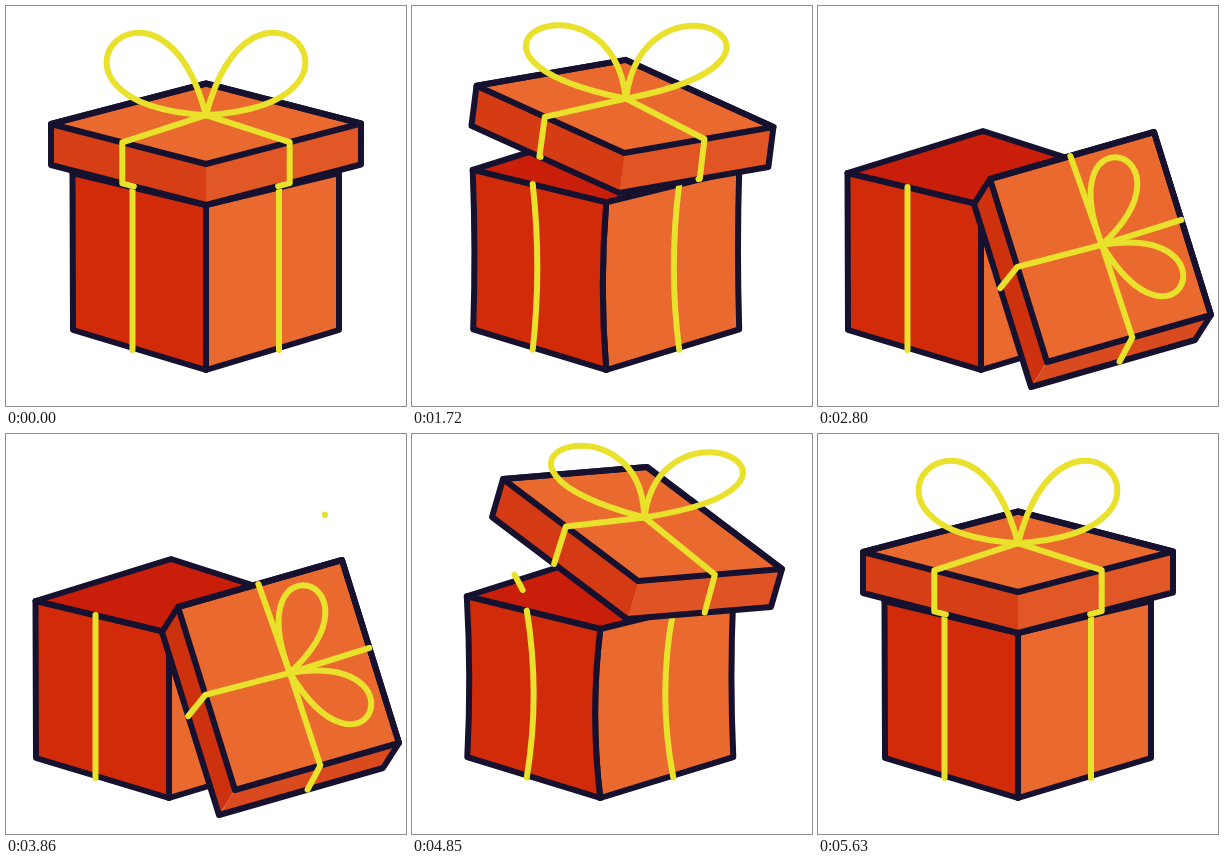
These frames come from a looping animation (400 px wide and 400 px high, 5660 ms). An HTML page with a canvas:

```html
<!DOCTYPE html>
<html lang="en">
<head>
<meta charset="utf-8">
<title>Gift box</title>
<style>
  html, body { margin: 0; width: 100%; height: 100%; overflow: hidden; background: #fff; }
  canvas { display: block; width: 100vw; height: 100vh; }
</style>
</head>
<body>
<canvas id="stage" width="400" height="400"></canvas>
<script>
const ctx = document.getElementById('stage').getContext('2d');
const INK = '#15112f', RIBBON = '#e9e12c', ORANGE = '#e9692f', RED = '#d22b0a', INSIDE = '#c81e0a';
const STEP = 30, LAST = 60, LOOP = 5660, FLOOR = 364;

const clamp = u => Math.min(1, Math.max(0, u));
const linear = (f, from, to) => clamp((f - from) / (to - from));
const ramp = (f, from, to) => {
  const u = linear(f, from, to);
  return u * u * (3 - 2 * u);
};
const lerp = (a, b, u) => [a[0] + (b[0] - a[0]) * u, a[1] + (b[1] - a[1]) * u];
const add = (a, b, k = 1) => [a[0] + b[0] * k, a[1] + b[1] * k];
const polar = (length, degrees) => {
  const a = degrees * Math.PI / 180;
  return [length * Math.cos(a), length * Math.sin(a)];
};

// The lid is a slab: left corner, two edges from it, and its thickness.
// The bow has an aim in degrees and a loop length.
const closed = { corner: [45, 118], toBack: [155, -40.5], toFront: [155, 40], depth: [0, 41], bow: [-90, 311] };
const flying = { corner: [91, 45], toBack: [144, -12], toFront: [135, 102], depth: [-11, 38], bow: [-87, 281] };
const landed = { corner: [172, 166], toBack: [164, -47], toFront: [57, 183], depth: [-16, 25], bow: [-47, 252] };
const flight = f => ramp(f, 21, 35);
const MIDAIR = flight(26);

// Quadratic curve through the three poses.
function lidPart(name, s) {
  return closed[name].map((a, i) => {
    const b = flying[name][i], c = landed[name][i];
    const rise = (b - a) / MIDAIR, fall = (c - b) / (1 - MIDAIR);
    return a + rise * s + (fall - rise) * s * (s - MIDAIR);
  });
}

function bezier(points, u) {
  while (points.length > 1) points = points.slice(1).map((p, i) => lerp(points[i], p, u));
  return points[0];
}

function paint(fill, stroke) {
  if (fill) { ctx.fillStyle = fill; ctx.fill(); }
  if (stroke) { ctx.strokeStyle = stroke; ctx.stroke(); }
}

function poly(points, fill, stroke, close = true) {
  ctx.beginPath();
  points.forEach(p => ctx.lineTo(...p));
  if (close) ctx.closePath();
  paint(fill, stroke);
}
const ribbon = points => poly(points, null, RIBBON, false);

function trimmed(curveAt, tail, head) {
  if (head <= tail) return;
  const points = [];
  for (let i = 0; i <= 40; i++) points.push(curveAt(tail + (head - tail) * i / 40));
  ribbon(points);
}

const streakAt = u => bezier([[120, 176], [85, 95], [10, 29]], u);
const arcAt = u => u < 1
  ? bezier([[148, 184], [138, 110], [165, 42], [207, 23]], u)
  : bezier([[207, 23], [245, -2], [295, 5], [319, 81]], u - 1);

function drawSun(size) {
  if (size < .02) return;
  ctx.save();
  ctx.translate(102, 54);
  ctx.scale(size, size);
  ctx.beginPath();
  ctx.arc(0, 0, 16, 0, 7);
  paint(null, RIBBON);
  for (let i = 0; i < 4; i++) {
    ribbon([[16, 0], [18.5, 0]]);
    ctx.rotate(Math.PI / 2);
  }
  ctx.restore();
}

function drawConfetti(f) {
  trimmed(streakAt, linear(f, 24, 40), linear(f, 24, 33));
  trimmed(arcAt, 2 * ramp(f, 33, 59.5), 2 * ramp(f, 27, 43));
  drawSun(ramp(f, 28, 34) - ramp(f, 39, 47));
}

// 1 is fully pressed down, below 0 is stretched.
const squashAt = f => ramp(f, 0, 11) - 1.6 * ramp(f, 14, 27) + .6 * ramp(f, 27, 35);
const squeezeY = (y, squash) => FLOOR - (FLOOR - y) * (1 - .042 * squash);

function drawBox(f, squash) {
  const slide = -37 * ramp(f, 20, 36);
  const at = (x, y) => [x + slide, squeezeY(y, squash)];
  const bend = (from, to, bulge) => {
    const mid = lerp(from, to, .5);
    ctx.quadraticCurveTo(mid[0] + 2 * bulge, mid[1], ...to);
  };
  const [left, front, right] = [at(66.5, 167), at(200, 199), at(333, 167)];
  const [lowLeft, lowFront, lowRight] = [at(67, 324), at(200, 364), at(333, 324)];
  const sideBulge = squash > 0 ? squash : squash * .2;

  poly([left, at(202, 125), right, front], INSIDE, INK);
  drawConfetti(f);

  const face = (top, low, bulge, fill) => {
    ctx.beginPath();
    ctx.moveTo(...top);
    bend(top, low, bulge * sideBulge);
    ctx.lineTo(...lowFront);
    bend(lowFront, front, 9 * squash);
    ctx.closePath();
    paint(fill, INK);
  };
  face(right, lowRight, 16, ORANGE);
  face(left, lowLeft, -19, RED);

  for (const [x, bulge] of [[126.5, -12], [273, 14]]) {
    const top = at(x, 181);
    ctx.beginPath();
    ctx.moveTo(...top);
    bend(top, at(x, 344), bulge * squash);
    paint(null, RIBBON);
  }
}

function drawBow(knot, aim, length, width, skew, press) {
  for (const side of [-1, 1]) {
    const axis = aim + 52 * side;
    const half = polar(length / 2, axis), spread = polar(width / 2, axis - side * skew);
    const handle = k => {
      const [x, y] = add(half, spread, k);
      return add(knot, [x * (1 + .04 * press), y * (1 - .13 * press)]);
    };
    ctx.beginPath();
    ctx.moveTo(...knot);
    ctx.bezierCurveTo(...handle(1), ...handle(-1), ...knot);
    paint(null, RIBBON);
  }
}

function drawLid(f, squash) {
  const s = flight(f), settle = ramp(f, 34, 58), press = Math.max(squash, 0);
  const [corner, toBack, toFront, depth, bow] =
    ['corner', 'toBack', 'toFront', 'depth', 'bow'].map(name => lidPart(name, s));
  const pressed = ([x, y]) => [x, squeezeY(y, press)];

  const topLeft = add(corner, [0, 7 * settle]);
  const top = [topLeft, add(topLeft, toBack), add(add(topLeft, toBack), toFront), add(topLeft, toFront)];
  const [L, B, R, F] = top.map(pressed);
  const [lowL, , lowR, lowF] = top.map(p => pressed(add(p, depth)));
  const knot = pressed(add(lerp(top[0], top[2], .5), depth, -.21 * (1 - .6 * s)));

  const shade = (r, g, b) => `rgb(${r - 8 * s},${g - 13 * s},${b - 7 * s})`;
  poly([L, F, lowF, lowL], shade(214, 62, 21));
  poly([F, R, lowR, lowF], shade(226, 87, 38));
  poly([L, B, R, F], ORANGE, INK);
  poly([L, B, R, lowR, lowF, lowL], null, INK);

  const hook = 1 - ramp(f, 20, 25), back = ramp(f, 27, 35);
  for (const [edge, low, side] of [[L, lowL, 1], [R, lowR, -1]]) {
    const drop = lerp(low, lowF, .46);
    const hookEnd = add(drop, [11.5 * side, 3], hook);
    ribbon([knot, lerp(edge, F, .46 + .02 * s), drop, hookEnd]);
    ribbon([knot, lerp(knot, lerp(B, edge, .495 + .015 * side), back)]);
  }

  drawBow(knot, bow[0] + 21 * settle, bow[1] - 15 * settle,
    225 - 25 * s - 40 * settle, 94 + 25 * Math.sin(Math.PI * linear(f, 20, 32)), press);
}

// Opens, rests, then plays the same steps backwards.
function stepAt(t) {
  if (t < 1030) return 0;
  if (t < 3860) return Math.min(LAST, Math.floor((t - 1000) / STEP));
  return Math.max(0, LAST - 1 - Math.floor((t - 3860) / STEP));
}

function render(now) {
  const f = stepAt(now % LOOP);
  const squash = squashAt(f);
  ctx.clearRect(0, 0, 400, 400);
  ctx.lineWidth = 6;
  ctx.lineCap = ctx.lineJoin = 'round';
  drawBox(f, squash);
  drawLid(f, squash);
}

const start = performance.now();
function tick() {
  render(performance.now() - start);
  requestAnimationFrame(tick);
}
tick();
</script>
</body>
</html>
```
